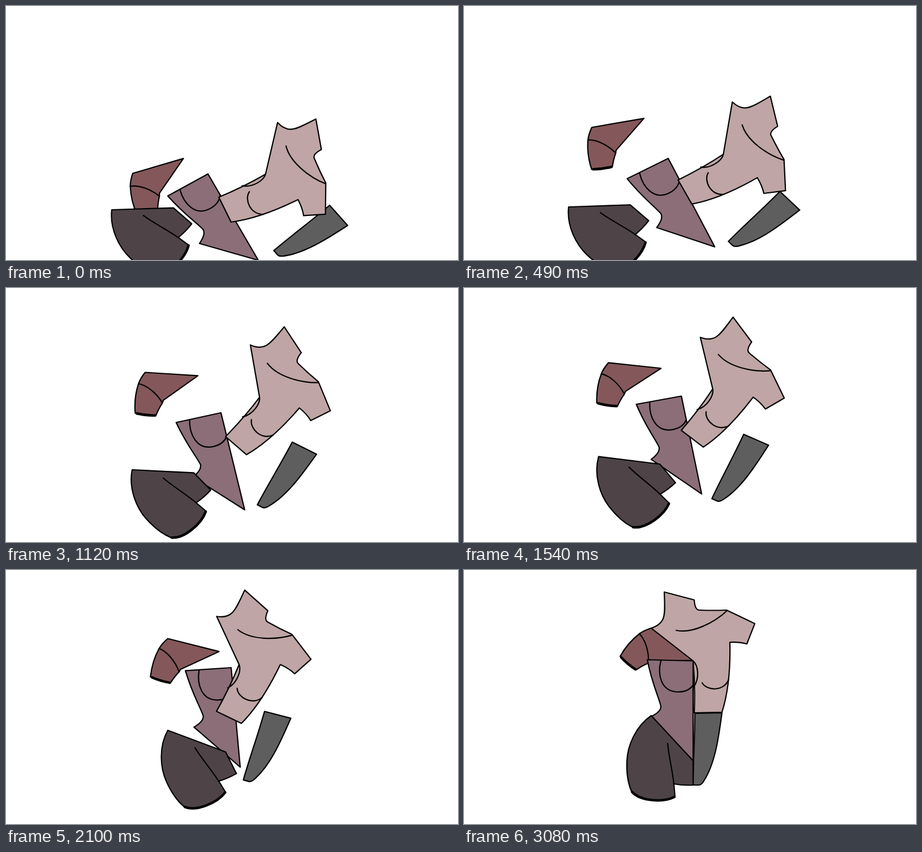
Write an HTML page that moves like this. It is 799 px wide and 450 px high and loops after 3.5 s.

```html
<!DOCTYPE html>
<html lang="en">
<head>
<meta charset="utf-8">
<title>Torso assembling</title>
<style>
  html, body { margin: 0; width: 100%; height: 100%; overflow: hidden; background: #fff; }
  svg { display: block; width: 100%; height: 100%; }
  path { stroke: #000; stroke-width: 2.2; stroke-linejoin: round; stroke-linecap: round; fill: none; }
  .hem { stroke-width: 4.5; }
</style>
</head>
<body>
<svg id="stage" viewBox="0 0 799 450"></svg>
<script>
const LOOP = 3500, STEP = 70, SETTLED = 3080;

const linear = u => u;
const easeIn = u => u ** 1.7;
const easeOut = u => 1 - easeIn(1 - u);

// Every piece goes through the same four moves, eased separately in x, y and angle.
const moves = [
  { from: 0, to: 490, ease: [linear, linear, linear] },
  { from: 490, to: 1120, ease: [easeOut, easeOut, easeOut] },
  { from: 1120, to: 2100, ease: [easeIn, easeOut, easeIn] },
  { from: 2100, to: SETTLED, ease: [linear, easeIn, easeIn] }
];

// Outlines are drawn assembled; `path` lists where the pivot [x, y, degrees] starts each move.
const parts = [
  { // left leg
    fill: '#5e5e5e',
    outline: 'M408 254 L456 253 C451 290 445 340 425 372 Q420 381 415 381 L405 381 C405 340 408 300 408 254 Z',
    pivot: [408, 254],
    path: [[572, 353, 49.5], [558.5, 328.5, 44.5], [506, 273, 27.7], [457, 250.5, 15.8]]
  },
  { // right shoulder
    fill: '#84585a',
    outline: 'M331 103 Q318 107 310 113 C297 123 285 137 276 153 L304 177 Q316 169 326 165 L330 162 L405 160 Z',
    lines: ['M310 113 C321 124 327 145 326 164'],
    hem: 'M278 155 Q289 167 303 176',
    pivot: [331, 103],
    path: [[224, 296.5, -54], [226, 215, -47.4], [246, 149.5, -34], [286, 121.5, -23.4]]
  },
  { // right side
    fill: '#8b6e78',
    outline: 'M324 159 L405 161 L405 338 L330 260 Q349 251 348 241 C343 222 332 200 324 159 Z',
    lines: ['M348 161 C342 184 347 216 379 216 C392 216 400 211 405 204'],
    pivot: [405, 161],
    path: [[357, 297.5, -30.2], [361, 270, -27.7], [380, 221, -13.7], [398, 173, -5.2]]
  },
  { // chest
    fill: '#bfa5a5',
    outline: 'M354 39 L407 53 Q408 71 416 71 Q440 72 464 71 L514 95 L500 131 Q486 127 470 128 ' +
             'C471 170 468 215 456 252 L407 253 Q409 205 405 161 L331 103 C359 94 355 76 354 39 Z',
    lines: ['M375 107 C404 113 443 93 465 72',
            'M421 200 C429 214 459 216 468 194',
            'M405 161 C414 169 417 192 406 207'],
    pivot: [380.5, 146],
    path: [[462, 269.5, 65], [460, 234, 61.6], [440, 166, 42], [397, 143, 27]]
  },
  { // right thigh
    fill: '#4e4448',
    outline: 'M331 258 C303 277 289 312 288 338 C287 360 290 378 296 392 C312 410 352 413 373 402 ' +
             'L371 379 Q388 382 405 381 L405 338 Z',
    lines: ['M360 307 C362 331 369 357 371 380'],
    hem: 'M297 393 C312 410 352 412 372 402',
    pivot: [331, 258],
    path: [[187, 361, -49], [185, 356, -49.2], [223, 322, -44.4], [286, 284, -26.7]]
  }
];

const stage = document.getElementById('stage');

function add(parent, tag, attrs = {}) {
  const node = document.createElementNS('http://www.w3.org/2000/svg', tag);
  for (const name in attrs) node.setAttribute(name, attrs[name]);
  return parent.appendChild(node);
}

for (const part of parts) {
  part.node = add(stage, 'g');
  add(part.node, 'path', { d: part.outline, style: `fill:${part.fill}` });
  for (const d of part.lines || []) add(part.node, 'path', { d });
  if (part.hem) add(part.node, 'path', { d: part.hem, class: 'hem' });
  part.path.push([...part.pivot, 0]);
}

function draw(ms) {
  const t = Math.min(Math.floor(ms % LOOP / STEP) * STEP, SETTLED);
  const index = moves.findIndex(move => t <= move.to);
  const { from, to, ease } = moves[index];
  const u = (t - from) / (to - from);
  for (const { node, path, pivot } of parts) {
    const [x, y, angle] = path[index].map((start, axis) =>
      start + (path[index + 1][axis] - start) * ease[axis](u));
    node.setAttribute('transform',
      `translate(${x} ${y}) rotate(${angle}) translate(${-pivot[0]} ${-pivot[1]})`);
  }
}

const start = performance.now();
function tick() {
  draw(Math.max(0, performance.now() - start));
  requestAnimationFrame(tick);
}
tick();
</script>
</body>
</html>
```
